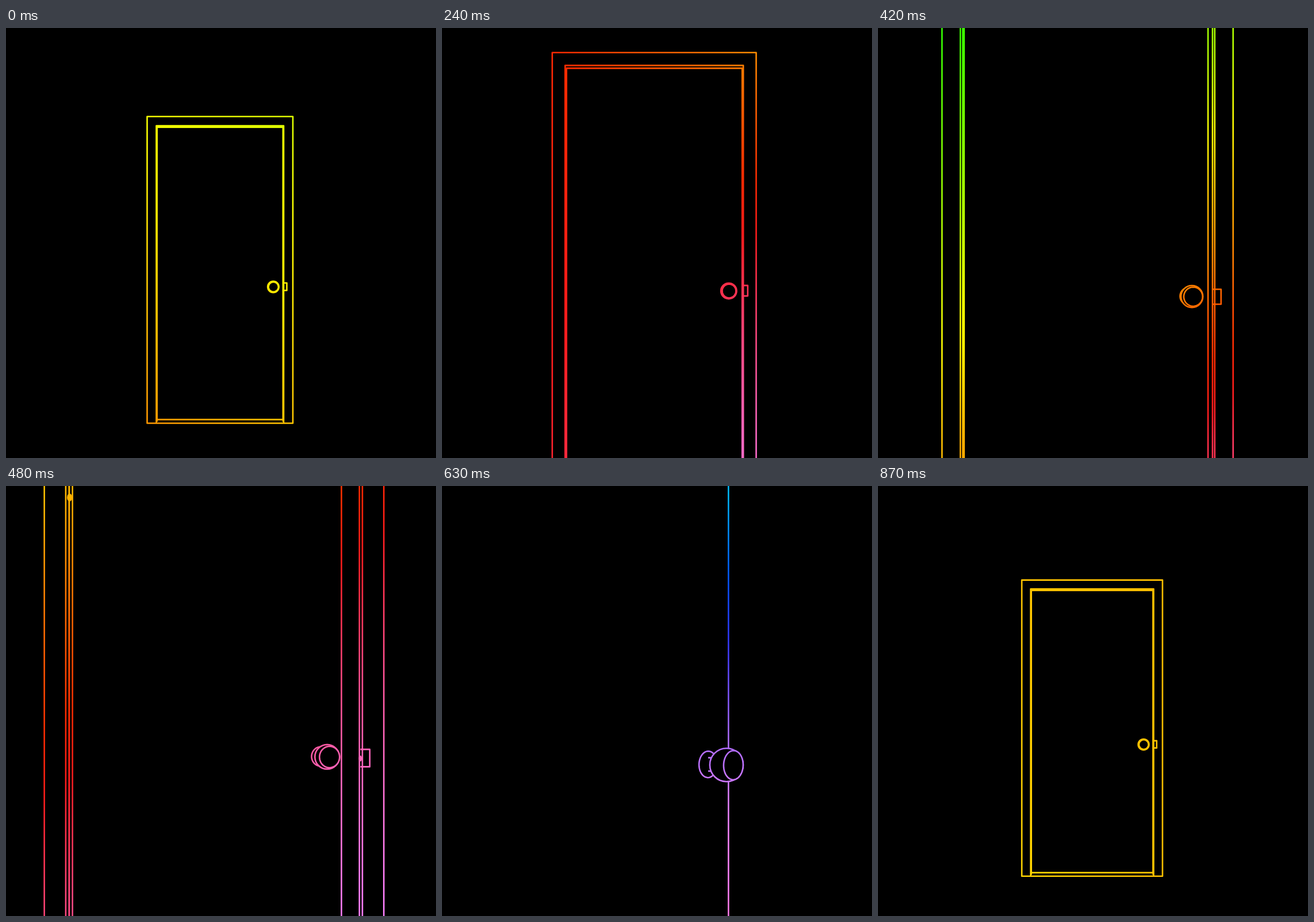
An HTML page with a canvas for the animation above (900 ms loop, 748 by 748 pixels).

```html
<!DOCTYPE html>
<html>
<head>
<meta charset="utf-8">
<style>
html, body { margin: 0; height: 100%; overflow: hidden; background: #000; }
canvas { display: block; }
</style>
</head>
<body>
<canvas id="stage" width="748" height="748"></canvas>
<script>
const SIZE = 748, LOOP = 900, STEP = 30;
const ctx = document.getElementById('stage').getContext('2d');

// Camera: x and y in pixels at depth NEAR, depth in ms of travel.
const VX = 380, VY = 432.5, NEAR = 841, DEPTH = 0.5;
const project = ([x, y, z]) => {
  const k = NEAR / Math.max(z, 4);
  return [VX + x * k, VY + y * k];
};

function trace(points, { close = false, fill = false, stroke = true } = {}) {
  ctx.beginPath();
  points.forEach(p => ctx.lineTo(...project(p)));
  if (close) ctx.closePath();
  if (fill) { ctx.fillStyle = fill; ctx.fill(); }
  if (stroke) ctx.stroke();
}

const box = (l, t, r, b, z) => [[l, b, z], [l, t, z], [r, t, z], [r, b, z]];

const LEFT = -118.5, RIGHT = 103, TOP = -262.5, FLOOR = 255, JAMB = 8;

function drawFrame(z, angle) {
  if (z < 30) return;
  trace(box(-134.5, -278.5, 119, FLOOR, z), { close: true });
  trace(box(LEFT, TOP, RIGHT, FLOOR, z));
  trace(box(LEFT, TOP, RIGHT, FLOOR, z + JAMB));
  trace([[101.5, 11, z], [108.5, 11, z], [108.5, 24, z], [101.5, 24, z]]);
  if (angle > 0.14) {
    dot(RIGHT + 0.7, 18.2, z + JAMB, 1.2, 2.2);
    dot(LEFT + 0.3, -181, z + JAMB, 2, 3);
  }
}

function dot(x, y, z, rx, ry) {
  const k = NEAR / z;
  ctx.beginPath();
  ctx.ellipse(...project([x, y, z]), rx * k, ry * k, 0, 0, 7);
  ctx.fillStyle = '#fff';
  ctx.fill();
}

function drawLeaf(z, angle) {
  const c = Math.cos(angle), s = Math.sin(angle);
  // along: distance from the hinge, out: distance in front of the leaf
  const at = (along, y, out = 0) => [
    LEFT + along * c + out * s, y, z + JAMB + DEPTH * (along * s - out * c)
  ];
  const width = RIGHT - LEFT, bottom = 251, knobX = 203.5, knobY = 17.8;
  const disc = (r, out) => trace(Array.from({ length: 48 }, (_, i) => {
    const a = i * Math.PI / 24;
    return at(knobX + r * Math.cos(a), knobY + r * Math.sin(a), out);
  }), { close: true, fill: '#000' });

  trace([at(0, bottom), at(0, TOP), at(width, TOP), at(width, bottom)],
    { close: true, fill: '#000' });
  if (angle > 0.1 && z > 30) {
    const x = LEFT + 10 * s;
    trace([[x, TOP, z + JAMB], [x, bottom, z + JAMB]]);
  }

  disc(7.9, 0);
  for (const y of [-4, 4]) trace([at(knobX, knobY + y), at(knobX, knobY + y, 5)]);
  const ball = at(knobX, knobY, 14.8);
  if (ball[2] > 10) {
    ctx.beginPath();
    ctx.arc(...project(ball), 9.8 * NEAR / ball[2], 0, 7);
    ctx.fillStyle = '#000';
    ctx.fill();
    ctx.stroke();
  }
  disc(8.5, 20.3);
}

function drawDoor(z, angle) {
  trace(box(LEFT, TOP, RIGHT, FLOOR, z), { fill: angle ? false : '#000', stroke: false });
  drawLeaf(z, angle);
  drawFrame(z, angle);
}

// Time, then hue at the top left, top right, bottom left and bottom right.
const HUES = [
  [0, 66, 78, 22, 55],
  [120, 250, 250, -25, 275],
  [240, -5, 53, 17, -62],
  [360, 180, 145, 123, 10],
  [480, 51, 2, -12, -70],
  [630, -165, -165, -45, -45],
  [870, 46, 44, 56, 40],
  [900, 66, 78, 22, 55]
];
const CELLS = 24;
const tint = document.createElement('canvas');
tint.width = tint.height = CELLS;
const tintCtx = tint.getContext('2d');
const mix = (a, b, k) => a + (b - a) * k;

function paintTint(t) {
  const i = HUES.findIndex(h => h[0] > t);
  const a = HUES[i - 1], b = HUES[i];
  const k = (t - a[0]) / (b[0] - a[0]);
  const [, tl, tr, bl, br] = a.map((v, j) => mix(v, b[j], k));
  for (let y = 0; y < CELLS; y++) {
    for (let x = 0; x < CELLS; x++) {
      const u = (x + 0.5) / CELLS, v = (y + 0.5) / CELLS;
      const hue = Math.min(120, mix(mix(tl, tr, u), mix(bl, br, u), v));
      const glow = Math.max(0, Math.cos((hue + 65) * 1.2 * Math.PI / 180));
      tintCtx.fillStyle = `hsl(${hue + 360}, 100%, ${50 + 25 * glow}%)`;
      tintCtx.fillRect(x, y, 1, 1);
    }
  }
}

function swing(t) {
  const u = Math.min(1, Math.max(0, (t - 319) / 634));
  return u * u * (3 - 2 * u) * Math.PI / 2;
}

function render(now) {
  const t = Math.floor(now % LOOP / STEP) * STEP;
  ctx.globalCompositeOperation = 'source-over';
  ctx.fillStyle = '#000';
  ctx.fillRect(0, 0, SIZE, SIZE);
  ctx.strokeStyle = '#fff';
  ctx.lineWidth = 2.6;
  ctx.lineJoin = 'round';
  drawDoor(NEAR + LOOP - t, 0);
  drawDoor(NEAR - t, swing(t));
  paintTint(t);
  ctx.globalCompositeOperation = 'multiply';
  ctx.drawImage(tint, 0, 0, SIZE, SIZE);
  requestAnimationFrame(() => render(performance.now() - start));
}

const start = performance.now();
render(0);
</script>
</body>
</html>
```
